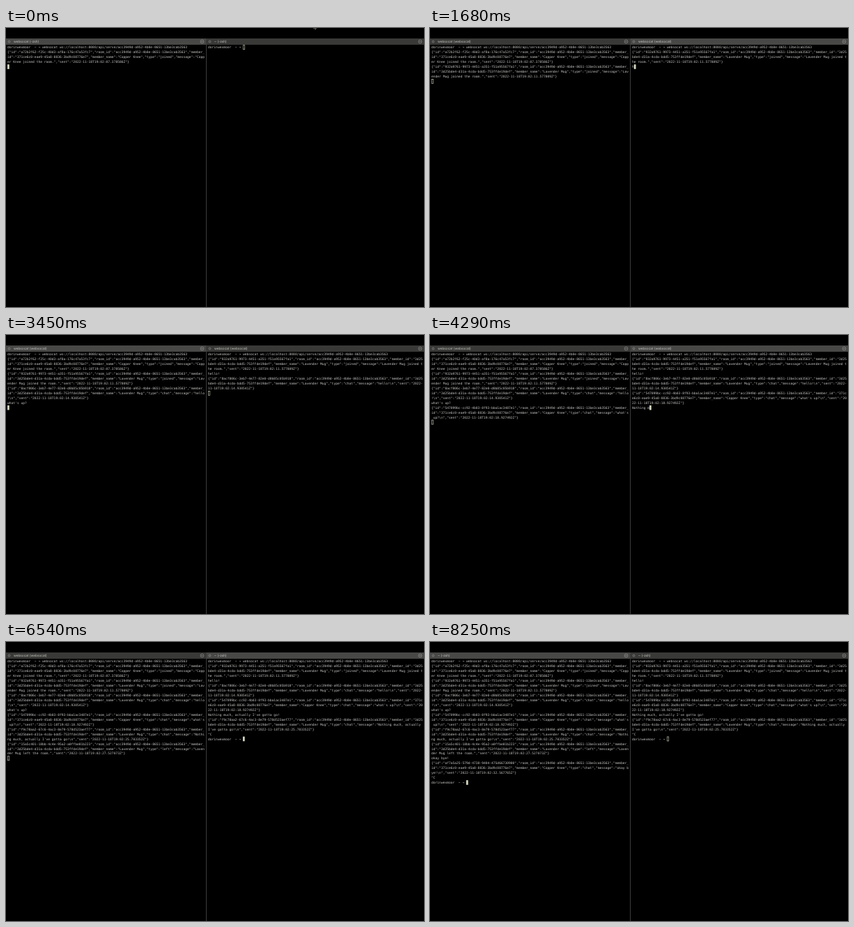
An HTML page with a canvas for the animation above (8.28 s loop, 600 by 400 pixels).

```html
<!DOCTYPE html>
<html lang="en">
<head>
<meta charset="utf-8">
<title>Two terminals chatting</title>
<style>
  html, body { margin: 0; width: 100%; height: 100%; overflow: hidden; background: #000; }
  canvas { display: block; width: 600px; height: 400px; }
</style>
</head>
<body>
<canvas id="stage" width="600" height="400"></canvas>
<script>
const ctx = document.getElementById('stage').getContext('2d');
const LOOP = 8280;
const FONT_SIZE = 4.61, CELL = FONT_SIZE * 0.602, ROW = 6.95, TOP = 27.7;
const TEXT = '#c6c6c4', TITLE = '#c8c8c4', CURSOR = '#d4d4c0';
const BAR_ACTIVE = '#484847', BAR_INACTIVE = '#393937', DIVIDER = '#3c3c3c';

const ROOM = 'acc3949d-a952-4b0e-8651-13be3cab3563';
const KNEE = { id: '371ce6c0-eae9-45a8-8836-3bd9c08776e7', name: 'Copper Knee' };
const MUG = { id: '3d25bde4-d31a-4cda-bdd5-753ffde19def', name: 'Lavender Mug' };
const PROMPT = 'dorinwexmoor  ~ → ';
const URL_ARG = 'ws://localhost:8080/api/serve/' + ROOM;

const json = (id, member, type, message, sent) =>
  `{"id":"${id}","room_id":"${ROOM}","member_id":"${member.id}","member_name":"${member.name}",` +
  `"type":"${type}","message":"${message}","sent":"2022-11-18T19:02:${sent}Z"}\n`;

const left = { x: 2, edge: 0, width: 287, cols: 102, log: [] };
const right = { x: 290, edge: 288, width: 312, cols: 111, log: [] };

const print = (pane, time, text) => pane.log.push({ time, text });
const broadcast = (time, ...fields) => [left, right].forEach(p => print(p, time, json(...fields)));

// Spreads the characters evenly from the first key press to the last.
function type(pane, start, end, text) {
  [...text].forEach((ch, i) =>
    print(pane, start + (end - start) * i / Math.max(1, text.length - 1), ch));
}

print(left, 0, PROMPT + 'websocat ' + URL_ARG + '\n');
print(left, 0, json('a72b2f62-f25c-40d3-af8a-176c47a53fc7', KNEE, 'joined', KNEE.name + ' joined the room.', '07.378586'));

print(right, 0, PROMPT);
type(right, 270, 630, 'websocat ');
print(right, 900, URL_ARG);
print(right, 1140, '\n');
broadcast(1260, '932a9761-9973-4451-a351-f51a95567fa1', MUG, 'joined', MUG.name + ' joined the room.', '11.577809');

type(right, 1680, 1890, 'hello');
print(right, 2130, '!');
print(right, 2280, '\n');
broadcast(2370, '8acf806c-3eb7-4e77-82e0-d0b85c05b918', MUG, 'chat', 'hello!\\n', '14.930541');

type(left, 2820, 3060, "what's ");
type(left, 3150, 3180, 'up');
print(left, 3330, '?');
print(left, 3420, '\n');
broadcast(3510, '547099bc-cc92-4b03-8f93-bba1ac3487e1', KNEE, 'chat', "what's up?\\n", '18.927492');

type(right, 4020, 4290, 'Nothing m');
type(right, 4330, 5340, "uch, actually I've gotta go!");
print(right, 5430, '\n');
broadcast(5550, 'f9c78aa2-67c6-4ac3-8e79-578d523aef77', MUG, 'chat', "Nothing much, actually I've gotta go!\\n", '25.703352');

print(right, 6030, '^C\n');
print(right, 6090, PROMPT);
print(left, 6150, json('15a5c401-18bb-4c4e-95a2-a0ffbe81b223', MUG, 'left', MUG.name + ' left the room.', '27.527073'));

type(left, 6810, 7200, 'okay bye!');
print(left, 7290, '\n');
print(left, 7380, json('af7a5a25-579d-4738-9404-475d66730900', KNEE, 'chat', 'okay bye!\\n', '32.567765'));
print(left, 7740, '^C\n');
print(left, 7830, PROMPT);

// Keyboard focus and window titles change at fixed times.
const focusChanges = [[0, left], [210, right], [2760, left], [3840, right], [6720, left]];
const IDLE = '~ (-zsh)', BUSY = 'websocat (websocat)';
left.titles = [[0, 'websocat (-zsh)'], [30, BUSY], [7830, IDLE]];
right.titles = [[0, IDLE], [1170, BUSY], [6090, IDLE]];

const latest = (changes, t) => changes.filter(c => c[0] <= t).pop()[1];

function wrap(text, cols) {
  return text.split('\n').flatMap(line => {
    const rows = [];
    for (let i = 0; i === 0 || i < line.length; i += cols) rows.push(line.slice(i, i + cols));
    return rows;
  });
}

function circle(x, y, r) {
  ctx.beginPath();
  ctx.arc(x, y, r, 0, Math.PI * 2);
  ctx.stroke();
}

function drawBar(pane, title, focused) {
  ctx.fillStyle = focused ? BAR_ACTIVE : BAR_INACTIVE;
  ctx.fillRect(pane.edge, 15, pane.width, 9);
  ctx.strokeStyle = '#a0a09c';
  ctx.lineWidth = 0.6;
  const end = Math.min(pane.edge + pane.width, 600) - 5.5;
  circle(pane.edge + 4.5, 19.5, 1.4);
  circle(end, 19.5, 2.4);
  ctx.beginPath();
  ctx.moveTo(end - 1.3, 19.5);
  ctx.lineTo(end + 1.3, 19.5);
  ctx.stroke();
  ctx.font = '4.7px Inter, sans-serif';
  ctx.fillStyle = TITLE;
  ctx.fillText(title, pane.edge + 11, 21.2);
}

function drawPane(pane, t, focused) {
  drawBar(pane, latest(pane.titles, t), focused);
  const text = pane.log.filter(e => e.time <= t).map(e => e.text).join('');
  const rows = wrap(text, pane.cols);
  ctx.font = FONT_SIZE + 'px "DejaVu Sans Mono", monospace';
  ctx.fillStyle = TEXT;
  rows.forEach((row, i) => ctx.fillText(row, pane.x, TOP + i * ROW + 1.7));

  const x = pane.x + rows[rows.length - 1].length * CELL;
  const y = TOP + (rows.length - 1) * ROW - 3.3;
  ctx.fillStyle = ctx.strokeStyle = CURSOR;
  ctx.lineWidth = 0.6;
  if (focused) ctx.fillRect(x, y, CELL, ROW - 0.3);
  else ctx.strokeRect(x + 0.3, y + 0.3, CELL - 0.3, ROW - 0.9);
}

function draw(t) {
  ctx.fillStyle = '#000';
  ctx.fillRect(0, 0, 600, 400);
  const focus = latest(focusChanges, t);
  [left, right].forEach(pane => drawPane(pane, t, pane === focus));
  ctx.fillStyle = DIVIDER;
  ctx.fillRect(287, 15, 1, 385);
  if (t < 780) {
    ctx.fillStyle = '#4a4a3c';
    ctx.fillRect(441, 0, 5, 1);
    ctx.fillRect(443, 1, 2, 1.5);
  }
}

ctx.textRendering = 'geometricPrecision';
const start = performance.now();
function tick() {
  draw((performance.now() - start) % LOOP);
  requestAnimationFrame(tick);
}
tick();
</script>
</body>
</html>
```
